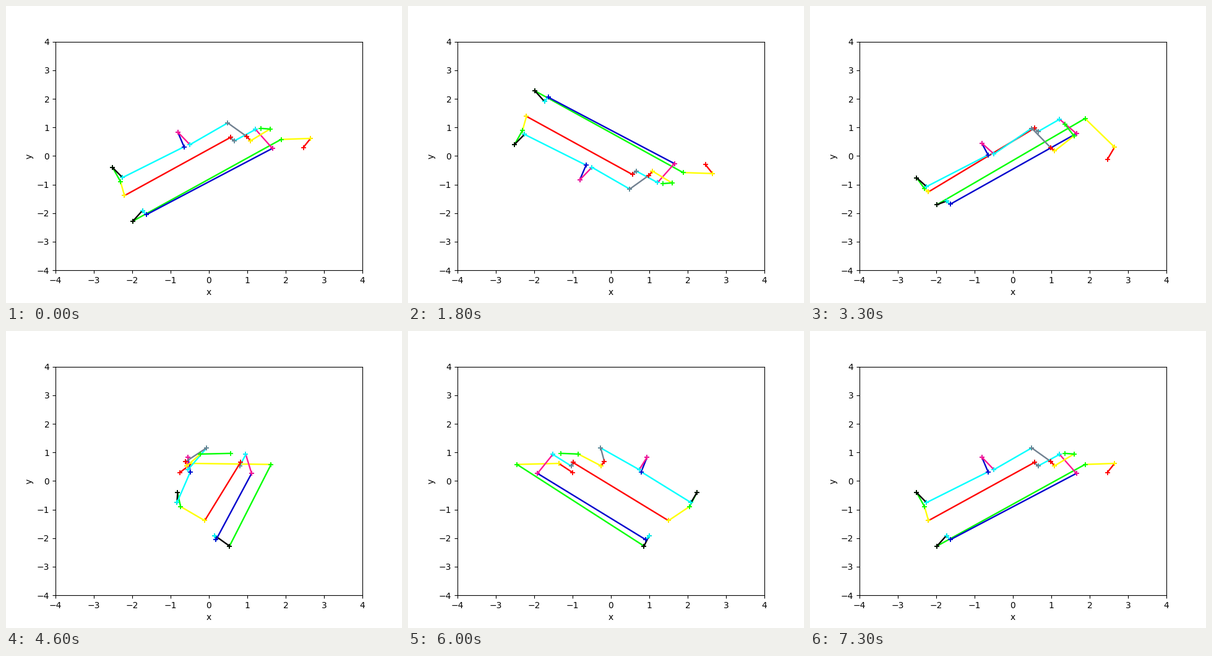
Write a matplotlib script that moves like this. It is 640x480 px and loops after 7.4 s.

```python
import numpy as np
import matplotlib.pyplot as plt
from matplotlib.animation import FuncAnimation

STEP = 10                    # degrees per frame
TURN = 360 // STEP + 1       # frames per full turn, both ends included
COLORS = ["red", "yellow", "lime", "black", "cyan",
          "mediumblue", "deeppink", "cyan", "slategray"]

# Tilted right-angled frame: u runs along the long arms
u = np.array([0.790, 0.572, 0.222])
w = np.array([-0.289, 0.028, 0.957])
v = np.cross(u, w)


def build_chain():
    """Walk the chain link by link, then centre it on the origin."""
    steps = [
        0.4 * u - 0.1 * v + 0.25 * w,
        2.2 * w - 0.17 * u,
        0.05 * v - 4.92 * u,
        0.32 * u - 0.24 * v - 0.43 * w,
        0.18 * v,
        4.13 * u + 0.05 * v,
        -0.81 * v,
        -0.71 * u,
        0.05 * w - 0.15 * v,
        -3.55 * u - 0.15 * w,
        0.06 * u - 0.58 * v - 0.56 * w,
        0.1 * u - 0.52 * v,
        0.42 * v - 0.1 * w,
        1.96 * u + 0.05 * v - 0.1 * w,
        0.15 * u - 0.52 * v,
        0.53 * v - 0.1 * w,
        1.32 * u + 0.2 * w,
        0.56 * v - 0.68 * w,
        0.18 * v,
        0.71 * u + 0.2 * w,
        0.82 * w,
    ]
    points = np.vstack([np.zeros(3), np.cumsum(steps, axis=0)])
    return points - points.mean(axis=0)


CHAIN = build_chain()


def project(frame):
    """Flat view of the chain: one turn about the x axis, then one about y."""
    turn, step = divmod(frame, TURN)
    angle = np.radians(step * STEP)
    c, s = np.cos(angle), np.sin(angle)
    x, y, z = CHAIN.T
    if turn == 0:
        return x, y * c - z * s
    return x * c + z * s, y


fig, ax = plt.subplots(figsize=(6.4, 4.8), dpi=100)
ax.set(xlim=(-4, 4), ylim=(-4, 4), xlabel="x", ylabel="y")
links = [ax.plot([], [], marker="+", lw=1.7, mew=1.25,
                 color=COLORS[i % len(COLORS)])[0]
         for i in range(len(CHAIN) - 1)]


def draw(frame):
    x, y = project(frame)
    for i, link in enumerate(links):
        link.set_data(x[i:i + 2], y[i:i + 2])
    return links


anim = FuncAnimation(fig, draw, frames=2 * TURN, interval=100,
                     repeat=True, repeat_delay=0)
plt.show()
```
